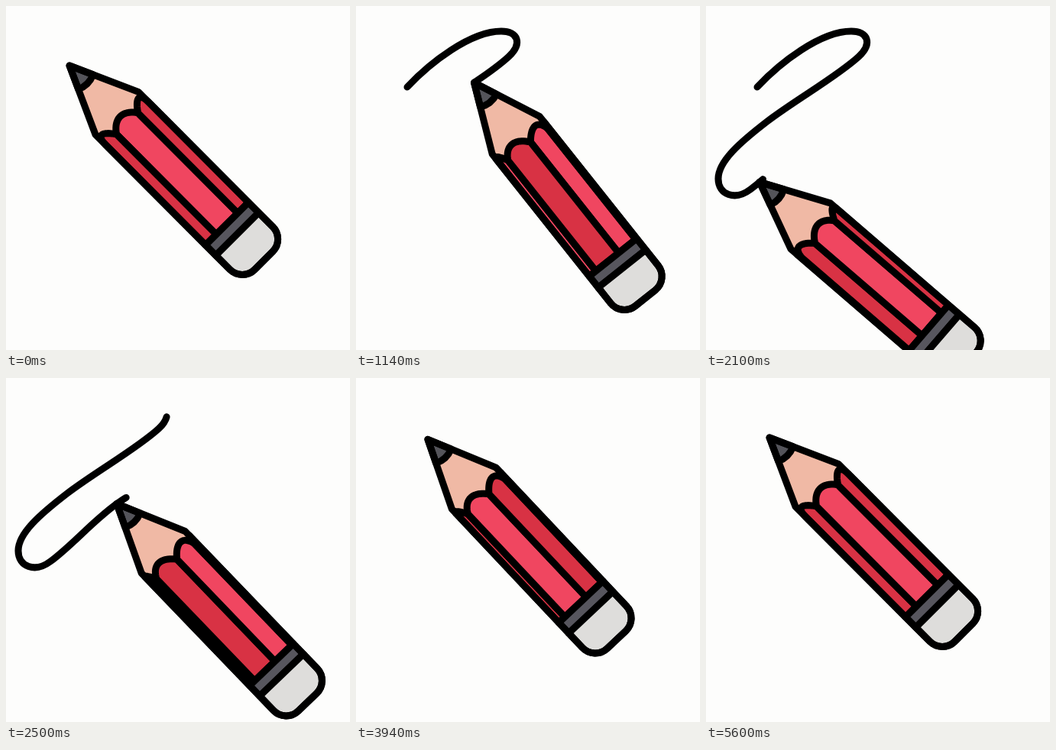
Write an HTML page that moves like this. It is 450 px wide and 450 px high and loops after 5640 ms.

```html
<!DOCTYPE html>
<html lang="en">
<head>
<meta charset="utf-8">
<title>Pencil</title>
<style>
  html, body { margin: 0; width: 100%; height: 100%; overflow: hidden; background: #fdfdfc; }
  svg { display: block; width: 100vw; height: 100vh; }
  .ink { stroke: #000; stroke-width: 9; stroke-linecap: round; stroke-linejoin: round; }
</style>
</head>
<body>
<svg viewBox="0 0 450 450">
  <path id="trail" class="ink" fill="none"/>
  <path id="route" fill="none"/>
  <!-- The pencil lies along x with its tip at the origin -->
  <g id="pencil">
    <path fill="#f0b9a5" d="M0 0 L88 -39.6 H112 V39.6 H88 Z"/>
    <path class="ink" stroke-width="8" fill="#54545a" d="M0 0 L30.1 -13.5 A33 33 0 0 1 30.1 13.5 Z"/>
    <g id="facets" class="ink"></g>
    <path class="ink" fill="#57565e" d="M292 -39.6 H311 V39.6 H292 Z"/>
    <path class="ink" fill="#dedddb" d="M311 -39.6 H337 A23 23 0 0 1 360 -16.6 V16.6 A23 23 0 0 1 337 39.6 H311 Z"/>
    <path class="ink" fill="none" d="M0 0 L88 -39.6 H337 A23 23 0 0 1 360 -16.6 V16.6 A23 23 0 0 1 337 39.6 H88 Z"/>
  </g>
</svg>
<script>
const LOOP = 5640, STEPS = 120, RADIUS = 39.6, BODY_END = 292;
const PINK = '#f04660', RED = '#d83244';

// The drawn stroke; the tip also travels to its start and home from its end
const STROKE = `67 106 C97 74 150 33 190 33 C212 33 218 49 200 66
  C172 92 118 122 80 151 C45 178 16 203 16 226 C16 247 38 255 58 240
  C88 218 118 182 150 161 C165 151 182 142 198 140`;
const HOME = '83 78';

const TRAVEL = [[0, 0], [13, .174], [35, .472], [53, .757], [70, .893], [85, .987], [95, 1]];
// The pencil rocks between these extremes of tilt, in degrees
const ROCKING = [[0, 45.1], [5, 41.5], [19, 54.5], [40, 39.5], [67, 53.5], [92, 45.1]];

const $ = id => document.getElementById(id);
const trail = $('trail'), route = $('route'), pencil = $('pencil'), facets = $('facets');
trail.setAttribute('d', `M${STROKE}`);
route.setAttribute('d', `M${HOME} L${STROKE} C204 138 204 108 174 97 C140 88 105 83 ${HOME}`);
const trailLength = trail.getTotalLength(), routeLength = route.getTotalLength();

const ramp = (n, from, to) => Math.min(1, Math.max(0, (n - from) / (to - from)));

// Smooth curve through [step, value] keys, level at every extreme
function curve(keys, n) {
  const last = keys.length - 1;
  if (n >= keys[last][0]) return keys[last][1];
  const slope = i => (keys[i + 1][1] - keys[i][1]) / (keys[i + 1][0] - keys[i][0]);
  const tangent = i => {
    if (i === 0 || i === last) return 0;
    const a = slope(i - 1), b = slope(i);
    return a * b > 0 ? 2 * a * b / (a + b) : 0;
  };
  let i = 0;
  while (n > keys[i + 1][0]) i++;
  const [t0, v0] = keys[i], [t1, v1] = keys[i + 1];
  const h = t1 - t0, u = (n - t0) / h, v = 1 - u;
  return v * v * (1 + 2 * u) * v0 + u * u * (3 - 2 * u) * v1
    + h * u * v * (v * tangent(i) - u * tangent(i + 1));
}

// cubic-bezier(.33, 0, .28, 1)
function ease(x) {
  let lo = 0, hi = 1;
  for (let i = 0; i < 24; i++) {
    const u = (lo + hi) / 2, v = 1 - u;
    if (3 * v * v * u * .33 + 3 * v * u * u * .28 + u * u * u < x) lo = u; else hi = u;
  }
  return lo * lo * (3 - 2 * lo);
}

// One side of the hexagonal body, seen from the front
function facetPath(mid) {
  const from = Math.max(mid - 30, -90), to = Math.min(mid + 30, 90);
  if (to - from < .5) return '';
  const side = deg => (-RADIUS * Math.sin(deg * Math.PI / 180)).toFixed(2);
  let d = `M${BODY_END} ${side(from)}`;
  for (let i = 0; i <= 20; i++) {
    const deg = from + (to - from) * i / 20;
    const bump = 1 - ((deg - mid) / 30) ** 2;
    d += `L${(107 - 13 * bump).toFixed(2)} ${side(deg)}`;
  }
  return d + `L${BODY_END} ${side(to)}Z`;
}

const sides = Array.from({ length: 6 }, (_, k) => {
  const p = document.createElementNS('http://www.w3.org/2000/svg', 'path');
  p.setAttribute('fill', k % 2 ? RED : PINK);
  return facets.appendChild(p);
});

function draw(n) {
  const tip = route.getPointAtLength(curve(TRAVEL, n) * routeLength);
  pencil.setAttribute('transform', `translate(${tip.x} ${tip.y}) rotate(${curve(ROCKING, n)})`);

  const roll = 240 * ease(n / STEPS);
  sides.forEach((p, k) => {
    const mid = (roll + 60 * k + 180) % 360 - 180;
    p.setAttribute('d', facetPath(mid));
  });

  const head = ramp(n, 6.5, 56.3) * trailLength, tail = ramp(n, 46, 72.6) * trailLength;
  trail.style.display = head - tail > .5 ? '' : 'none';
  trail.style.strokeDasharray = `${head - tail} ${2 * trailLength}`;
  trail.style.strokeDashoffset = -tail;
}

// Steps come in threes lasting 20, 100 and 20 ms
function stepAt(t) {
  const rest = t % 140;
  return Math.min(STEPS, 3 * Math.floor(t / 140) + (rest < 20 ? 0 : rest < 120 ? 1 : 2));
}

const start = performance.now();
function tick() {
  draw(stepAt((performance.now() - start) % LOOP));
  requestAnimationFrame(tick);
}
tick();
</script>
</body>
</html>
```
